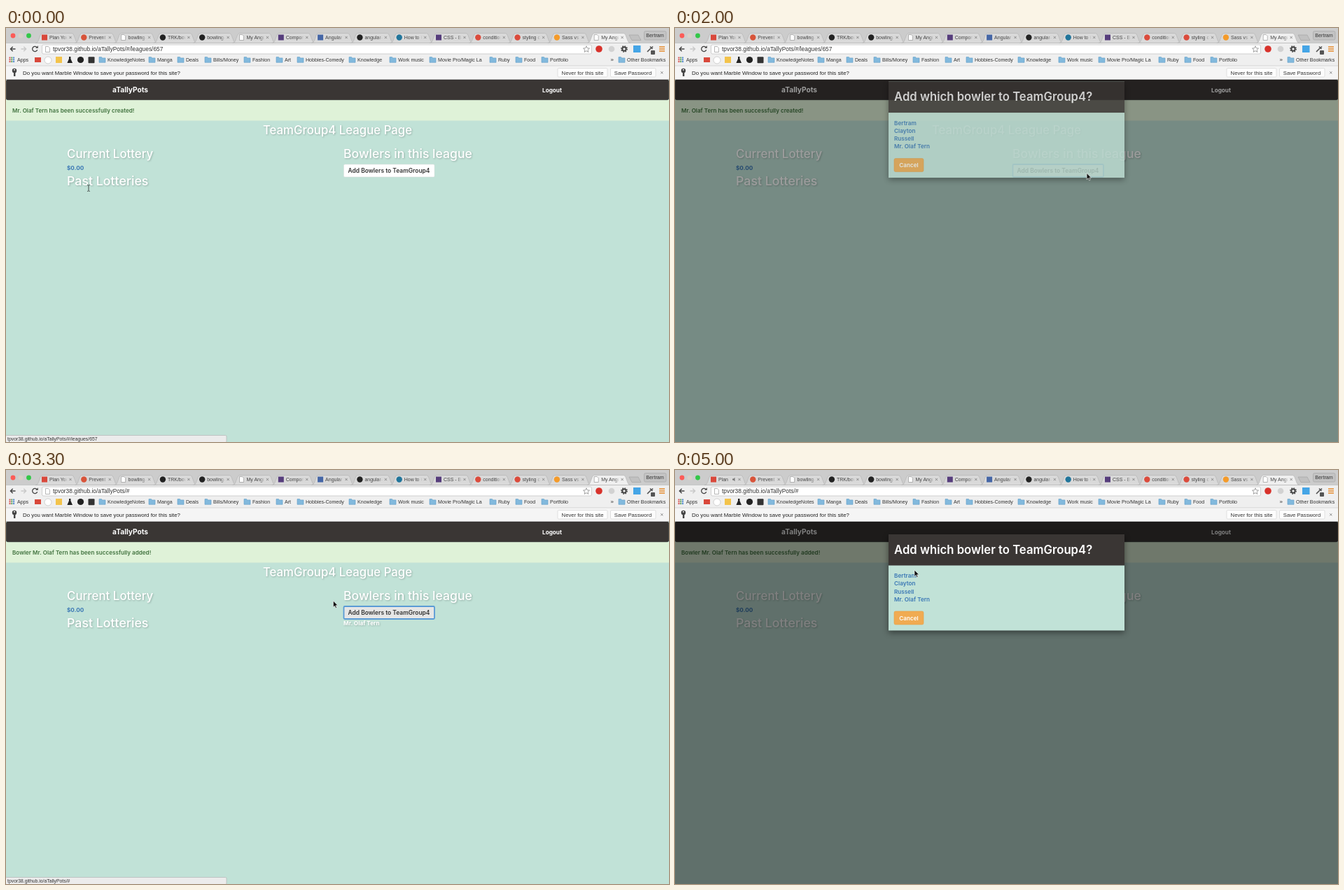
An HTML page for the animation above (5100 ms loop, 947 px wide and 592 px high).

```html
<!DOCTYPE html>
<html lang="en">
<head>
<meta charset="utf-8">
<style>
  html, body { margin: 0; width: 100%; height: 100%; overflow: hidden; background: #c1e2d7; }
  svg { display: block; }
  text { white-space: pre; }
  .ui { font-family: "Liberation Sans", Arial, sans-serif; }
  .page { font-family: Inter, sans-serif; }
  .soft { filter: drop-shadow(1px 1px 1px rgba(0, 0, 0, .22)); }
  .raised { filter: drop-shadow(0 3px 4px rgba(0, 0, 0, .45)); }
</style>
</head>
<body>
<svg id="stage" width="947" height="592" viewBox="0 0 947 592"></svg>
<script>
const LOOP = 5100, STEP = 100;
const FIRST_OPEN = 1883, CLOSE = 3080, SECOND_OPEN = 4301;
const PERSON = 'Mr. Olaf Tern', LEAGUE = 'TeamGroup4', APP = 'aTallyPots';
const SITE = `tpvor38.github.io/${APP}/#`, LEAGUE_URL = SITE + '/leagues/657';
const BOWLERS = ['Bertram', 'Clayton', 'Russell', PERSON];
const ROW_TOP = 145.4, ROW_H = 11.3;
const TAB_FILL = '#d9d9d9', TOOLBAR = '#efefef';

const text = (x, y, s, size, fill = '#333', weight = 400, anchor = 'start', id = '') =>
  `<text id="${id}" x="${x}" y="${y}" font-size="${size}" fill="${fill}" font-weight="${weight}" text-anchor="${anchor}">${s}</text>`;
const box = (x, y, w, h, fill, extra = '') =>
  `<rect x="${x}" y="${y}" width="${w}" height="${h}" fill="${fill}" ${extra}/>`;
const dot = (x, y, r, fill, extra = '') => `<circle cx="${x}" cy="${y}" r="${r}" fill="${fill}" ${extra}/>`;
const line = (d, stroke, width = 1) =>
  `<path d="${d}" fill="none" stroke="${stroke}" stroke-width="${width}"/>`;
const cross = (x, y, r = 1.6) => line(`M${x - r} ${y - r}l${2 * r} ${2 * r}m0 ${-2 * r}l${-2 * r} ${2 * r}`, '#777', .8);
const sheet = (x, y) =>
  `<path d="M${x - 3} ${y - 4}h4l2 2v6h-6z" fill="#fff" stroke="#999" stroke-width=".7"/>`;
const folder = (x, y) =>
  `<path d="M${x} ${y}h3.5l1 1.3h4.5v6.4h-9z" fill="#82b9dd" stroke="#5f9cc6" stroke-width=".6"/>`;
const fadeOut = (id, color) => `<linearGradient id="${id}">
  <stop stop-color="${color}" stop-opacity="0"/><stop offset=".5" stop-color="${color}"/></linearGradient>`;

// Tabs: label, icon kind (d = sheet, s = square, c = circle), icon colour
const TABS = [
  ['Plan You', 's', '#d9483b'], ['Prevent E', 'c', '#d8543a'], ['bowling-', 'd'],
  ['TRK/bow', 'c', '#222'], ['bowling-', 'c', '#222'], ['My Angu', 'd'],
  ['Compon', 's', '#563d7c'], ['Angular c', 's', '#4566a6'], ['angular-', 'c', '#222'],
  ['How to C', 'c', '#21759b'], ['CSS - Bo', 's', '#563d7c'], ['condition', 'c', '#db4b3c'],
  ['styling c', 'c', '#db4b3c'], ['Sass vs.', 'c', '#f49b2a'], ['My Angu', 'd']
];

function tab([label, kind, color], i) {
  const x = 55 + 56.3 * i, active = i === TABS.length - 1;
  const icon = kind === 'd' ? sheet(x, 13.5) : kind === 's' ? box(x - 4, 9.5, 8, 8, color) : dot(x, 13.5, 4.2, color);
  return `<path d="M${x - 13} 21.5q3 0 4-3l3-8q1-3 3-3h42q2 0 3 3l3 8q1 3 4 3z"
    fill="${active ? TOOLBAR : TAB_FILL}" stroke="#b0b0b0" stroke-width=".6"/>` + icon +
    text(x + 7, 16, label, 7, '#444', 400, 'start', i ? '' : 'firstTab') +
    box(x + 26, 9, 14, 9, `url(#${active ? 'activeFade' : 'tabFade'})`) + cross(x + 37, 13.5);
}

const BOOKMARKS = [
  [145, 'KnowledgeNotes'], [216, 'Manga'], [257, 'Deals'], [296, 'Bills/Money'], [352, 'Fashion'],
  [398, 'Art'], [428, 'Hobbies-Comedy'], [502, 'Knowledge'], [560, 'Work music'],
  [617, 'Movie Pro/Magic La'], [703, 'Ruby'], [740, 'Food'], [777, 'Portfolio'], [887, 'Other Bookmarks']
];

const appsGrid = [...Array(9).keys()].map(i =>
  box(4.5 + i % 3 * 2.8, 41.5 + (i / 3 | 0) * 2.8, 2, 2, ['#d9534f', '#5a9e5a', '#4f86d0'][i % 3])).join('');

const browser = `<g class="ui">
  <defs>${fadeOut('tabFade', TAB_FILL)}${fadeOut('activeFade', TOOLBAR)}</defs>
  ${box(0, 0, 947, 21.5, '#cccccc')}
  ${dot(10, 11, 3.4, '#fc5b57')}${dot(21, 11, 3.4, '#d9d0c8')}${dot(32.5, 11, 3.4, '#33c748')}
  <path d="M890 10h13l4 7.500h-13z" fill="#c1c1c1" stroke="#a5a5a5" stroke-width=".7"/>
  ${box(911.5, 4.5, 31.5, 12.5, '#c3c3c3', 'rx="2" stroke="#a8a8a8" stroke-width=".7"')}
  ${text(927, 13.4, BOWLERS[0], 7.2, '#333', 400, 'middle')}
  ${box(0, 21.5, 947, 32.5, TOOLBAR)}
  ${line('M0 21.500H947', '#b8b8b8', .6)}
  ${TABS.map(tab).join('')}
  <path id="speaker" d="M82 12.500h1.500l2-1.700v5.400l-2-1.700h-1.500z" fill="#777"/>
  ${line('M13.500 30H6.500m3.200-3.300L6.400 30l3.300 3.300', '#444', 1.4)}
  ${line('M21.500 30h7m-3.200-3.300L28.600 30l-3.300 3.300', '#c9c9c9', 1.4)}
  ${line('M44.300 28a3.600 3.600 0 1 0 .4 3.200', '#444', 1.3)}
  <path d="M42.300 28.800h3.500v-3.500z" fill="#444"/>
  ${box(51.5, 24, 785, 13, '#fff', 'rx="2" stroke="#c4c4c4" stroke-width=".8"')}
  ${sheet(59.5, 30.5)}
  ${text(67, 33.2, '', 8.4, '#333', 400, 'start', 'url')}
  <path d="M829 25.800l1.300 3 3.200.3-2.400 2.100.7 3.200-2.800-1.700-2.800 1.700.7-3.200-2.400-2.100 3.200-.3z" fill="none" stroke="#888" stroke-width=".8"/>
  ${dot(847, 30, 4.8, '#d8322b')}${dot(865, 30, 4.3, '#d2d2d2')}
  ${dot(883, 30, 2.7, 'none', 'stroke="#444" stroke-width="2"')}
  ${dot(883, 30, 4.2, 'none', 'stroke="#444" stroke-width="1.400" stroke-dasharray="1.650"')}
  ${box(896, 25, 10.5, 10, '#45a5e6')}
  ${line('M916 34l5.500-5.500m-1.500-2l3.500 3.500m-1.500-1.500l2-2', '#555', 1.7)}${box(921, 32, 6, 6, '#555', 'rx="1"')}
  ${line('M933 27h8m-8 3h8m-8 3h8', '#e58a2c', 1.7)}
  ${appsGrid}${text(16, 48, 'Apps', 7.1)}
  ${box(41, 42, 9, 7, '#d9483b')}${dot(60, 46, 5, '#fff', 'stroke="#aaa" stroke-width=".5"')}
  ${box(71, 41, 9, 9, '#f3c34b')}
  <path d="M90 41h2.400v3l2.600 6h-7.600l2.600-6z" fill="#222"/>
  ${dot(106.5, 45.5, 4.6, '#222')}${box(117.5, 41.2, 9, 9, '#333', 'rx="1"')}
  ${BOOKMARKS.map(([x, s]) => folder(x - 12, 41.6) + text(x, 48, s, 7.1)).join('')}
  ${text(863.5, 48, '»', 8)}
  ${box(0, 54, 947, 20, '#f5f5f5')}${line('M0 54H947', '#c9c9c9', .7)}${line('M0 73.500H947', '#aaa', .8)}
  ${dot(12, 61, 3.2, '#444')}${box(11, 62, 2.4, 7, '#444')}${box(11, 59, 2, 1.5, '#f5f5f5')}
  ${text(24, 66.5, 'Do you want Marble Window to save your password for this site?', 7.85, '#222')}
  ${box(788, 57.5, 71, 12.5, '#fdfdfd', 'rx="1.500" stroke="#d5d5d5" stroke-width=".7"')}
  ${box(863.5, 57.5, 64.5, 12.5, '#fdfdfd', 'rx="1.500" stroke="#d5d5d5" stroke-width=".7"')}
  ${text(823.5, 66.5, 'Never for this site', 7.7, '#333', 400, 'middle')}
  ${text(895.5, 66.5, 'Save Password', 7.7, '#333', 400, 'middle')}
  ${cross(936.8, 63.8)}
</g>`;

const page = `<g class="page">
  ${box(0, 74, 947, 518, '#c1e2d7')}
  ${box(0, 103, 947, 29.5, '#dff2d8')}
  ${box(.3, 74, 946.4, 28.7, '#3a3634', 'rx="2.500" stroke="#2a2726" stroke-width=".6"')}
  ${text(152, 92, APP, 10.2, '#fff', 700)}${text(766, 91.5, 'Logout', 8.2, '#fff', 700)}
  ${text(9, 121, '', 8.1, '#41733f', 600, 'start', 'notice')}
  <g class="soft">
    ${text(473.5, 152.3, `${LEAGUE} League Page`, 16.8, '#fff', 500, 'middle')}
    ${text(87, 186.3, 'Current Lottery', 16.9, '#fff', 500)}
    ${text(87, 225.3, 'Past Lotteries', 17.8, '#fff', 500)}
    ${text(482, 186.1, 'Bowlers in this league', 17.6, '#fff', 500)}
    ${text(482, 222, PERSON, 8.2, '#fff', 700, 'start', 'member')}
  </g>
  ${text(87, 203, '$0.00', 8.2, '#3b78b5', 700)}
  <rect id="addButton" x="482.500" y="195" width="129.500" height="18" rx="1.500"/>
  ${text(547, 207, `Add Bowlers to ${LEAGUE}`, 8.45, '#333', 600, 'middle')}
</g>`;

const modal = `<rect id="backdrop" y="74" width="947" height="518"/>
<g id="modal" class="page">
  <g class="raised">${box(305, 92, 337, 137.5, '#c1e2d7')}</g>
  ${box(305, 92, 337, 44.5, '#3a3634')}
  ${text(313, 119.7, `Add which bowler to ${LEAGUE}?`, 16.7, '#fff', 600)}
  ${box(313, 0, 321, ROW_H, '#e9e9e0', 'id="rowHover"')}
  ${BOWLERS.map((s, i) => text(313, 154 + ROW_H * i, s, 8.2, '#3b78b5', 600, 'start', 'row' + i)).join('')}
  ${box(313, 202, 42, 19, '#f0ab52', 'rx="2" stroke="#e59f42" stroke-width=".6"')}
  ${text(334, 214.5, 'Cancel', 8.2, '#fff', 600, 'middle')}
</g>`;

const statusBar = `<g id="status" class="ui">
  ${box(-1, 582.5, 316, 10, '#ececec', 'rx="1.500" stroke="#b5b5b5" stroke-width=".7"')}
  ${text(2, 589.5, '', 6.85, '#333', 400, 'start', 'statusText')}</g>`;

const pointers = `<g id="pointer" stroke-linejoin="round">
  <path id="arrow" d="M0 0v9.200l2.100-1.900 1.400 3.200 1.500-.7-1.400-3.100h2.900z" fill="#111" stroke="#fff" stroke-width=".6"/>
  <path id="hand" d="M0 .6q1-1 1.700.2v3.400l4 .8q1 .4.900 1.600l-.7 3.700h-4.400l-3.300-4.200q0-1.200 1.300-.7l.6.600z" fill="#fff" stroke="#222" stroke-width=".8"/>
  <path id="beam" d="M-1.800-4.500q1.500 0 1.800.8.300-.8 1.800-.8M0-3.700v7.400M-1.800 4.500q1.500 0 1.800-.8.300.8 1.800.8" fill="none" stroke="#222" stroke-width=".8"/>
</g>`;

stage.innerHTML = page + modal + statusBar + browser + pointers;
const $ = id => document.getElementById(id);
const show = (id, on) => $(id).style.display = on ? '' : 'none';
const clamp = v => Math.max(0, Math.min(1, v));

// Pointer stops: time, x, y
const PATH = [
  [0, 118, 229], [450, 100, 202], [700, 100, 202], [1200, 606, 214], [1300, 604, 212.5],
  [1600, 589, 207.5], [2100, 588, 207.5], [2700, 343, 187], [3050, 343, 187], [3450, 525, 187],
  [3700, 525, 187], [4200, 542, 199], [4500, 542, 199], [4900, 346, 181], [5000, 342, 143]
];

function pointerAt(t) {
  const i = PATH.findIndex(stop => stop[0] >= t);
  if (i < 1) return PATH[0].slice(1);
  const [t0, x0, y0] = PATH[i - 1], [t1, x1, y1] = PATH[i];
  const p = (t - t0) / (t1 - t0), e = p * p * (3 - 2 * p);
  return [x0 + (x1 - x0) * e, y0 + (y1 - y0) * e];
}

function statusAt(t) {
  if (t < 500) return LEAGUE_URL;
  if (t < 1500) return LEAGUE_URL + '/lotteries/1178/current';
  return t >= 2600 && t < 3800 ? SITE : '';
}

function draw(t) {
  const added = t >= CLOSE, second = t >= SECOND_OPEN;
  const closing = added && !second;
  const elapsed = t - (second ? SECOND_OPEN : closing ? CLOSE : FIRST_OPEN);
  const fade = closing ? 1 - clamp(elapsed / 150) : clamp(elapsed / 150);
  const slide = 1 - Math.pow(1 - clamp(elapsed / 300), 1.6);
  const lift = -34 * (closing ? slide : 1 - slide);

  const [x, y] = pointerAt(t);
  const within = (l, top, r, b) => x >= l && x <= r && y >= top && y <= b;
  const open = fade > 0 && !closing;
  const row = open && fade === 1 && within(313, ROW_TOP, 634, ROW_TOP + 4 * ROW_H)
    ? Math.floor((y - ROW_TOP) / ROW_H) : -1;
  const overButton = !open && within(482, 195, 613, 214);
  const link = row >= 0 || overButton || !open && within(87, 195, 111, 205);
  const kind = link ? 'hand' : t < 300 ? 'beam' : 'arrow';

  $('url').textContent = added ? SITE : LEAGUE_URL;
  $('notice').textContent = added ? `Bowler ${PERSON} has been successfully added!`
    : `${PERSON} has been successfully created!`;
  show('member', added);

  const focused = t >= FIRST_OPEN, button = $('addButton');
  button.setAttribute('fill', focused || overButton && t > 1300 ? '#e6e6e6' : '#fff');
  button.setAttribute('stroke', focused ? '#5a9bd5' : '#ddd');
  button.setAttribute('stroke-width', focused ? 1.8 : .5);

  $('backdrop').setAttribute('opacity', fade / 2);
  $('modal').setAttribute('opacity', fade);
  $('modal').setAttribute('transform', `translate(0 ${lift})`);
  show('modal', fade > 0);
  show('rowHover', row >= 0);
  $('rowHover').setAttribute('y', ROW_TOP + ROW_H * row);
  BOWLERS.forEach((_, i) => $('row' + i).setAttribute('fill', i === row ? '#234a70' : '#3b78b5'));

  const status = statusAt(t);
  $('statusText').textContent = status;
  show('status', status);
  $('firstTab').textContent = t >= 4900 ? 'Plan' : TABS[0][0];
  show('speaker', t >= 4900);

  $('pointer').setAttribute('transform', `translate(${x} ${y})`);
  for (const k of ['arrow', 'hand', 'beam']) show(k, k === kind);
}

function tick() {
  const t = performance.now() % LOOP;
  draw(Math.floor(t / STEP) * STEP);
  requestAnimationFrame(tick);
}
tick();
</script>
</body>
</html>
```
